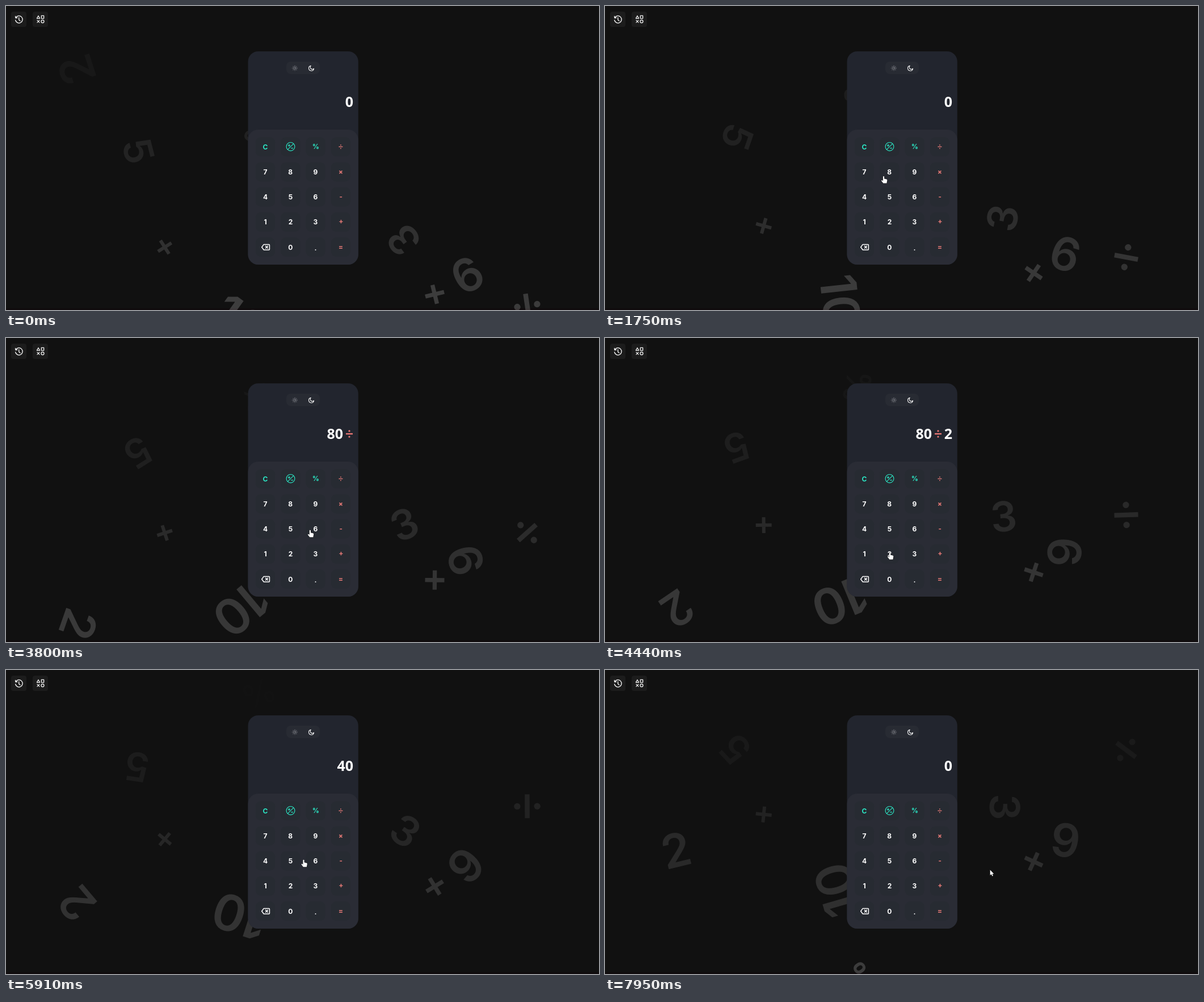
Animation, 1045 px wide and 536 px high, one loop 8 s. Source, as an HTML page with a canvas:

```html
<!DOCTYPE html>
<html lang="en">
<head>
<meta charset="utf-8">
<title>Calculator</title>
<style>
html, body { margin: 0; width: 100%; height: 100%; overflow: hidden; background: #111; }
canvas { display: block; width: 1045px; height: 536px; }
</style>
</head>
<body>
<canvas id="stage" width="1045" height="536"></canvas>
<script>
const c = document.getElementById('stage').getContext('2d');
const LOOP = 8, RISE = 563;
const FONT = 'Inter, "Open Sans", sans-serif';
const DISPLAY_FONT = '700 25px "Open Sans", "Noto Sans", sans-serif';
const TEAL = '#2be6c4', CORAL = '#de7673', WHITE = '#fff';

// Drifting symbols: each rises, turns twice and fades over its period
const symbols = [
  { s: '2', x: 126, base: 590, start: 0.85, period: 12.6, size: 82 },
  { s: '5', x: 231, base: 597, start: 0.605, period: 37.8, size: 70 },
  { s: '3', x: 702.5, base: 594, start: 0.3235, period: 26.25, size: 73 },
  { s: '9', x: 811.5, base: 589, start: 0.207, period: 26.25, size: 81 },
  { s: '10', x: 412, base: 586, start: 0.0497, period: 26.25, size: 88 },
  { s: '%', x: 446, base: 588, start: 0.655, period: 18.9, size: 60 },
  { s: '÷', x: 918.5, base: 592, start: 0.1133, period: 11.56, size: 42 },
  { s: '+', x: 279.7, base: 611, start: 0.33, period: 26.25, size: 28 },
  { s: '+', x: 755.5, base: 568, start: 0.106, period: 26.25, size: 34 }
];

// What the display shows from each moment on
const entries = [[0, '0'], [1.9, '8'], [2.65, '80'], [3.5, '80÷'], [4.4, '80÷2'], [5.25, '40'], [7, '0']];

// Pointer tip: time, x, y
const path = [
  [0.4, 1040, 318], [0.84, 860, 330], [1.5, 505, 312], [1.75, 491, 300], [1.95, 492, 298],
  [2.4, 501, 421], [2.6, 502, 420], [2.74, 543, 361], [3.25, 590, 246], [3.5, 590, 246],
  [3.8, 536, 338.5], [4.15, 501, 378], [4.45, 502, 378], [5, 596, 426], [5.4, 596, 426],
  [6.4, 456, 247], [7.1, 456, 246], [7.7, 672, 350], [8, 680, 353]
];

function box(x, y, w, h, r, fill) {
  c.fillStyle = fill;
  c.beginPath();
  c.roundRect(x, y, w, h, r);
  c.fill();
}

function dot(x, y, r) {
  c.beginPath();
  c.arc(x, y, r, 0, Math.PI * 2);
  c.fill();
}

function stroke(d, color, width) {
  c.strokeStyle = color;
  c.lineWidth = width;
  c.lineCap = c.lineJoin = 'round';
  c.stroke(new Path2D(d));
}

// Text with its ink centred on a point
function glyph(s, x, y, size, weight) {
  c.font = `${weight} ${size}px ${FONT}`;
  c.textAlign = 'left';
  const m = c.measureText(s);
  c.fillText(s, x + (m.actualBoundingBoxLeft - m.actualBoundingBoxRight) / 2,
    y + (m.actualBoundingBoxAscent - m.actualBoundingBoxDescent) / 2);
}

function divide(x, y, w) {
  c.fillRect(x - w / 2, y - w * 0.1, w, w * 0.2);
  dot(x, y - w * 0.42, w * 0.135);
  dot(x, y + w * 0.42, w * 0.135);
}

function plus(x, y, w) {
  const k = w * 0.215;
  c.beginPath();
  c.rect(x - w / 2, y - k / 2, w, k);
  c.rect(x - k / 2, y - w / 2, k, w);
  c.fill();
}

function drawSymbol(o, t) {
  const p = (o.start + t / o.period) % 1;
  c.save();
  c.translate(o.x, o.base - RISE * p);
  c.rotate(p * Math.PI * 4);
  c.fillStyle = `rgba(255,255,255,${0.2 * (1 - p)})`;
  if (o.s === '÷') divide(0, 0, o.size);
  else if (o.s === '+') plus(0, 0, o.size);
  else glyph(o.s, 0, -0.03 * o.size, o.size, 600);
  c.restore();
}

function drawTools() {
  box(9, 10, 27, 27, 4, '#1c1c1c');
  box(47, 10, 27, 27, 4, '#1c1c1c');
  stroke('M17.4 20.6A6.3 6.3 0 1 1 16.7 25M16.6 18.2L17 21.2L20 20.8M22.8 20.5V24.4L25 26.2', WHITE, 1.3);
  stroke('M57 17.2L59.6 21.8H54.4ZM62.3 17.2H66.7V21.8H62.3ZM55 25.2L59 29.2M59 25.2L55 29.2' +
    'M67 27.2A2.5 2.5 0 1 1 62 27.2A2.5 2.5 0 1 1 67 27.2', WHITE, 1.2);
}

function drawToggle() {
  box(494, 98, 59, 22, 8, '#282b33');
  c.fillStyle = '#92949a';
  for (let i = 0; i < 8; i++) {
    const a = i * Math.PI / 4;
    dot(509 + 4.1 * Math.cos(a), 109.5 + 4.1 * Math.sin(a), 0.65);
  }
  stroke('M511 109.5A2 2 0 1 1 507 109.5A2 2 0 1 1 511 109.5', '#92949a', 1);
  stroke('M542.5 110.4A4.5 4.5 0 1 1 537.2 105.3A3.6 3.6 0 0 0 542.5 110.4Z', WHITE, 1.1);
}

function drawKeys() {
  const rows = ['C~%÷', '789×', '456-', '123+', '<0.='];
  rows.forEach((row, j) => [...row].forEach((k, i) => {
    const x = 457 + i * 44.3, y = 248.2 + j * 44.2;
    box(x - 17, y - 17, 34, 34, 9, '#272b32');
    c.fillStyle = i === 3 ? CORAL : j === 0 ? TEAL : WHITE;
    if (k === '~') {
      stroke('M508.9 247.9A7.4 7.4 0 1 1 494.1 247.9A7.4 7.4 0 1 1 508.9 247.9M506.7 242.8L496.3 253.1' +
        'M497.2 245.8H500.6M498.9 244.1V247.5M502.6 250.6H505.6', TEAL, 1.15);
    } else if (k === '<') {
      stroke('M454.3 420.4H463.4Q464.4 420.4 464.4 421.4V429Q464.4 430 463.4 430H454.3L450.7 425.2Z' +
        'M457.6 423.4L461.2 427M461.2 423.4L457.6 427', WHITE, 1.5);
    } else if (k === '÷') {
      divide(x, y, 7);
    } else if ('%×-+='.includes(k)) {
      glyph(k, x, y, 11.5, 800);
    } else {
      glyph(k, x, y + (k === '.' ? 4.4 : 0), 12, 700);
    }
  }));
}

function drawDisplay(t) {
  const text = entries.filter(e => e[0] <= t).pop()[1];
  const [left, right] = text.split('÷');
  let edge = 611;
  c.font = DISPLAY_FONT;
  c.textAlign = 'right';
  c.fillStyle = WHITE;
  if (right) {
    c.fillText(right, 612, 177.6);
    edge = 593;
  }
  if (right !== undefined) {
    c.fillStyle = '#ea7673';
    divide(edge - 6, 169, 12);
    edge -= 18;
  }
  c.fillStyle = WHITE;
  c.fillText(left, edge + 1, 177.6);
}

function drawCalculator(t) {
  box(426.5, 80, 194.3, 376, 18, '#22252e');
  box(426.5, 218, 194.3, 238, 18, '#2a2c35');
  drawToggle();
  drawDisplay(t);
  drawKeys();
}

function drawPointer(t) {
  const i = path.findIndex(p => p[0] > t);
  if (i < 1) return;
  const [a, b] = [path[i - 1], path[i]];
  const u = (t - a[0]) / (b[0] - a[0]);
  const x = a[1] + (b[1] - a[1]) * u, y = a[2] + (b[2] - a[2]) * u;
  const overKeys = x > 440 && x < 608 && y > 231 && y < 443;
  const shape = new Path2D(overKeys
    ? 'M-1.1 .7Q0-.7 1.1.7V4.6L5.3 5.6Q6.6 6 6.3 7.5L5.4 12.6H-.6L-4 8.3Q-4.1 6.7-2.5 7.3L-1.1 8.4Z'
    : 'M0 0V9.6L2.2 7.6L3.7 11L5.2 10.3L3.7 7.1H6.7Z');
  c.save();
  c.translate(x, y);
  c.strokeStyle = '#111';
  c.lineWidth = 1;
  c.lineJoin = 'round';
  c.stroke(shape);
  c.fillStyle = WHITE;
  c.fill(shape);
  c.restore();
}

function frame(now) {
  const t = (now / 1000) % LOOP;
  c.fillStyle = '#111';
  c.fillRect(0, 0, 1045, 536);
  c.fillStyle = '#100b0d';
  c.fillRect(0, 533, 1045, 3);
  symbols.forEach(o => drawSymbol(o, t));
  drawTools();
  drawCalculator(t);
  drawPointer(t);
  requestAnimationFrame(frame);
}
requestAnimationFrame(frame);
</script>
</body>
</html>
```
